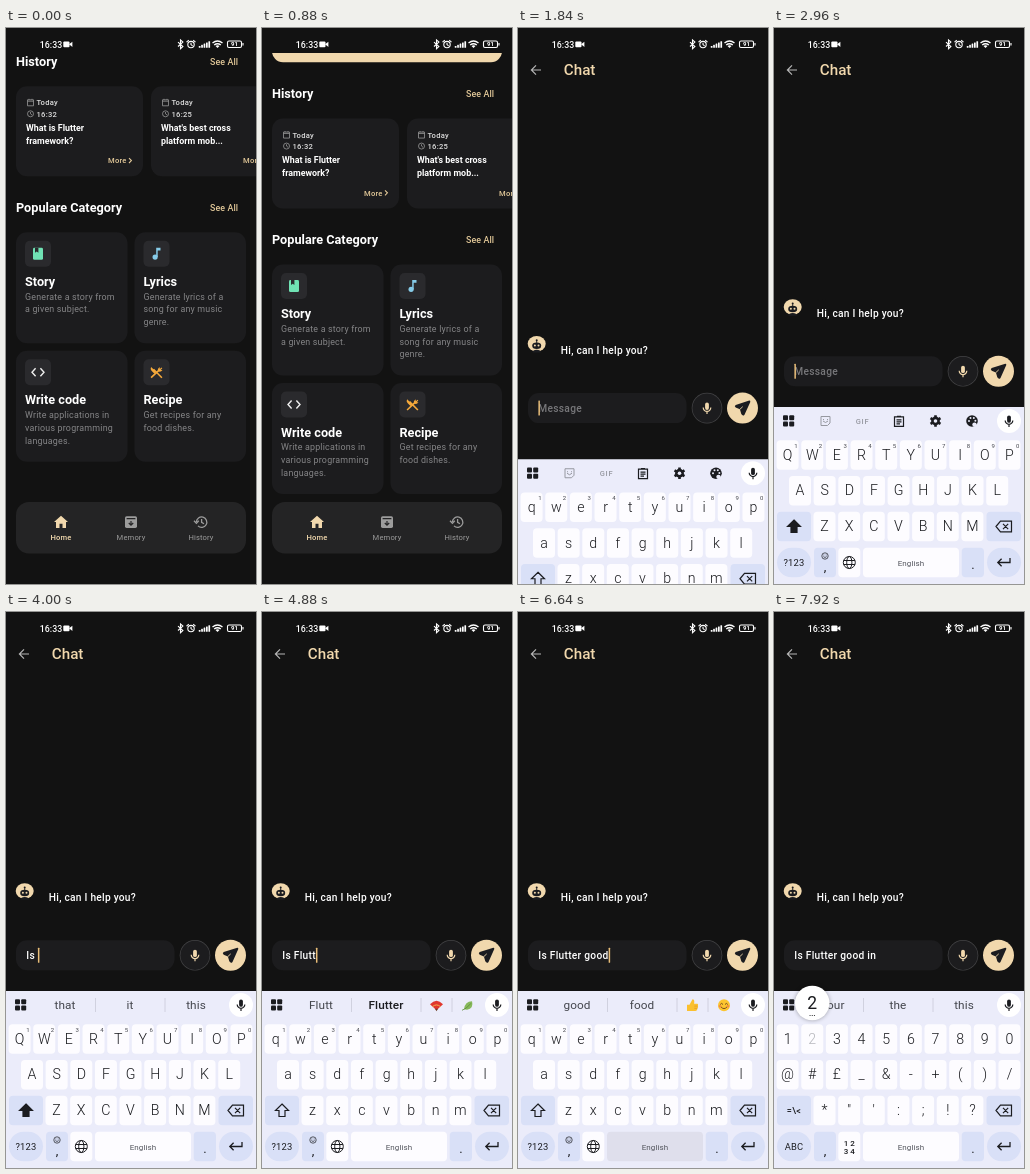
Write an HTML page with a canvas that moves like this. It is 250 px wide and 556 px high and loops after 8000 ms.

```html
<!DOCTYPE html>
<html lang="en">
<head>
<meta charset="utf-8">
<style>
  html, body { margin: 0; width: 100%; height: 100%; overflow: hidden; background: #121212; }
  canvas { display: block; width: 250px; height: 556px; }
</style>
</head>
<body>
<canvas id="stage"></canvas>
<script>
const canvas = document.getElementById('stage'), c = canvas.getContext('2d');
const ratio = window.devicePixelRatio || 1;
canvas.width = 250 * ratio;
canvas.height = 556 * ratio;

const BG = '#121212', CARD = '#1c1c1e', CREAM = '#f1d8ad', WHITE = '#fff', INK = '#1b1c20';
const KEY = '#fdfcff', SPECIAL = '#d9e0f7', BOARD = '#ebecfa';
const LOOP = 8000, RELEASE = 90;

const clamp = v => Math.max(0, Math.min(1, v));
const span = (t, from, to) => clamp((t - from) / (to - from));
const smooth = u => u * u * (3 - 2 * u);
const easeOut = u => 1 - (1 - u) ** 2;

// Drawing helpers
function box(x, y, w, h, r, fill) {
  c.beginPath();
  c.roundRect(x, y, w, h, r);
  c.fillStyle = fill;
  c.fill();
}
function disc(x, y, r, fill, ry = r) {
  c.beginPath();
  c.ellipse(x, y, r, ry, 0, 0, 7);
  c.fillStyle = fill;
  c.fill();
}
// Filled path, or a stroked one when a line width is given
function icon(x, y, path, color, width) {
  c.save();
  c.translate(x, y);
  c.fillStyle = c.strokeStyle = color;
  c.lineWidth = width;
  if (width) c.stroke(new Path2D(path)); else c.fill(new Path2D(path));
  c.restore();
}
function text(str, x, y, size, color, weight = 400, spacing = 0, align = 'left') {
  c.font = `${weight} ${size}px Roboto, sans-serif`;
  c.letterSpacing = spacing + 'px';
  c.textAlign = align;
  c.fillStyle = color;
  c.fillText(str, x, y);
  return c.measureText(str).width;
}
function robot(x, y, r, skin, face) {
  c.save();
  c.translate(x, y);
  c.scale(r / 10, r / 10);
  disc(0, -.8, 10, skin, 8.6);
  icon(0, 0, 'M-4.6 9Q-4.6 5.8 0 5.8Q4.6 5.8 4.6 9Z', face);
  icon(0, 0, 'M0 -4.6V-1.5', face, 1);
  disc(0, -4.8, 1.1, face);
  disc(0, 1.4, 5, face, 3.6);
  disc(-2, 1.2, 1.1, skin);
  disc(2, 1.2, 1.1, skin);
  c.restore();
}
function mic(x, y, color) {
  box(x - 1.9, y - 5.6, 3.8, 7.4, 1.9, color);
  icon(x, y, 'M-3.8 -.5A3.8 3.8 0 0 0 3.8 -.5M0 3.4V6', color, 1.2);
}
function clock(x, y, r, color, width) {
  icon(x, y, `M${r} 0A${r} ${r} 0 1 1 ${-r} 0A${r} ${r} 0 1 1 ${r} 0M0 ${-r * .6}V0L${r * .5} ${r * .4}`, color, width);
}

function statusBar() {
  text('16:33', 33.8, 19.5, 8.8, WHITE, 500);
  box(57.3, 13.4, 6.2, 5.8, 1, WHITE);
  icon(63, 16.3, 'M0 0L3.4 -2.6V2.6Z', WHITE);
  icon(174.5, 16.3, 'M-2.5 -2.2L2.4 2.2L0 4.4V-4.4L2.4 -2.2L-2.5 2.2', WHITE, 1.1);
  clock(185, 16.6, 3.2, WHITE, 1.1);
  icon(185, 16.5, 'M-4.5 -2.4L-2.2 -4.4M4.5 -2.4L2.2 -4.4', WHITE, 1.1);
  for (let i = 0; i < 5; i++) box(192.8 + i * 2.4, 18 - i * 1.2, 1.7, 1.8 + i * 1.2, .4, WHITE);
  icon(211.5, 20, 'M-5 -5Q0 -9 5 -5M-3.3 -3Q0 -5.6 3.3 -3', WHITE, 1.4);
  icon(211.5, 20, 'M0 0L-2 -2Q0 -3.4 2 -2Z', WHITE);
  icon(221.5, 13, 'M1.5 0H12.5Q14 0 14 1.5V5Q14 6.5 12.5 6.5H1.5Q0 6.5 0 5V1.5Q0 0 1.5 0M15.5 2V4.6', WHITE, 1.1);
  text('91', 228.5, 18.4, 6, WHITE, 600, 0, 'center');
}

// Home page
function sectionTitle(title, y) {
  text(title, 10, y, 12.7, WHITE, 700);
  text('See All', 204, y - .8, 8.9, '#e3c999', 500, .1);
}
function historyCard(x, y, time, lines) {
  box(x, y, 127, 90, 11, CARD);
  icon(x + 11.5, y + 12.5, 'M0 1H6V7H0ZM0 2.4H6M1.5 0V1M4.5 0V1', '#999', .8);
  clock(x + 14.5, y + 27.5, 3, '#999', .8);
  text('Today', x + 20.5, y + 19, 7.6, '#dedede', 500, .25);
  text(time, x + 20.5, y + 30.5, 7.6, '#dedede', 500, .25);
  lines.forEach((line, i) => text(line, x + 10, y + 44.8 + i * 12.7, 8.9, WHITE, 700));
  text('More', x + 92, y + 77, 7.6, '#e3c999', 500, .25);
  icon(x + 113, y + 74.3, 'M0 -2.4L2.4 0L0 2.4', '#e3c999', 1.1);
}
function categoryCard(x, y, title, lines, drawIcon) {
  box(x, y, 111.5, 111, 11, CARD);
  box(x + 9, y + 8.5, 26, 26, 5, '#2a2a2d');
  drawIcon(x + 22, y + 21.5);
  text(title, x + 9, y + 53.5, 12.7, WHITE, 700);
  lines.forEach((line, i) => text(line, x + 9, y + 67.3 + i * 12.8, 8.9, '#858587', 400, .2));
}
const categories = [
  ['Story', ['Generate a story from', 'a given subject.'], (x, y) => {
    box(x - 5, y - 6, 10, 12, 1.4, '#70e2b4');
    icon(x - 3, y - 6, 'M0 0H3.4V5L1.7 3.8L0 5Z', '#2a2a2d');
  }],
  ['Lyrics', ['Generate lyrics of a', 'song for any music', 'genre.'], (x, y) => {
    disc(x - 1.4, y + 3.3, 2.6, '#86cbe8');
    icon(x, y, 'M-.3 3.3V-6H4V-3.4H1.2V3.3Z', '#86cbe8');
  }],
  ['Write code', ['Write applications in', 'various programming', 'languages.'], (x, y) =>
    icon(x, y, 'M-2.4 -4L-6 0L-2.4 4M2.4 -4L6 0L2.4 4', '#eee', 1.4)],
  ['Recipe', ['Get recipes for any', 'food dishes.'], (x, y) => {
    icon(x, y, 'M5.4 5.4L-3 -3M-5.4 5.4L2.6 -2.2', '#f5a93b', 1.6);
    icon(x, y, 'M-5.4 -5.4L-.2 -.2L-2 1.4L-5 -1.6Q-6.6 -3.5 -5.4 -5.4ZM1.4 -1.2Q.6 -3.4 3 -5.2L3.4 -3.2L5 -4.8L5.8 -4L4.2 -2.4L6 -2.2Q4 .6 1.4 -1.2Z', '#f5a93b');
  }],
];
function navBar() {
  c.fillStyle = BG;
  c.fillRect(0, 500, 250, 56);
  box(10, 474, 230, 51.5, 13, '#242425');
  icon(55, 494, 'M0 -6.3L7 0H5V6H1.5V1.8H-1.5V6H-5V0H-7Z', CREAM);
  box(119, 488.3, 12, 11.6, 1.6, '#9c9c9c');
  icon(125, 494, 'M-4.4 -3.4H4.4M0 -1V3M-2.2 1L0 3.2L2.2 1', '#242425', 1.2);
  icon(195, 494, 'M-4.6 0A5.2 5.2 0 1 1 -3 3.9M-7 -1.2L-4.6 1.4L-2.2 -1.2M.6 -3V.4L3 1.8', '#9c9c9c', 1.3);
  ['Home', 'Memory', 'History'].forEach((label, i) =>
    text(label, 55 + 70 * i, 511.8, 7.6, i ? '#9c9c9c' : CREAM, i ? 400 : 500, .15, 'center'));
}
function home(scroll) {
  c.save();
  c.beginPath();
  c.rect(0, 25, 250, 531);
  c.clip();
  c.translate(0, -scroll);
  text('Blethy', 10, 53.5, 20.4, CREAM, 600);
  box(197, 34, 43, 25, 12.5, CREAM);
  icon(209.5, 46.7, 'M0 -4.6L1.3 -1.5L4.5 -1.3L2 .8L2.8 4L0 2.2L-2.8 4L-2 .8L-4.5 -1.3L-1.3 -1.5Z', INK);
  text('20', 217.5, 51.3, 12.7, INK, 500);

  box(10, 73, 230, 122, 11, CREAM);
  text('Tap to chat', 20.3, 119, 22.5, INK, 500);
  box(190, 95, 40, 32, 15, '#141416');
  icon(210, 111, 'M-7.5 0H6M1 -5L6.2 0L1 5', CREAM, 2.2);
  robot(31.5, 159, 11, INK, CREAM);
  box(48, 149, 174, 36, 6, '#ecc986');
  text('Ask me any questions you have. I can', 53.5, 163.6, 8.9, '#4d463b', 400, .18);
  text('answer all questions and talk to you', 53.5, 176.6, 8.9, '#4d463b', 400, .18);

  sectionTitle('History', 231);
  historyCard(10, 251.3, '16:32', ['What is Flutter', 'framework?']);
  historyCard(145, 251.3, '16:25', ["What's best cross", 'platform mob...']);
  sectionTitle('Populare Category', 376.7);
  categories.forEach((item, i) => categoryCard(10 + 118.5 * (i % 2), 397.3 + 118.5 * (i >> 1), ...item));
  c.restore();
  navBar();
}

// Typing: press time and key
const strokes = [
  [2720, 'shift'], [3040, 'I'], [3360, 's'], [3600, ' '], [3840, 'shift'],
  [4160, 'F'], [4320, 'l'], [4480, 'u'], [4600, 't'], [4740, 't'], [4945, 'e'], [5190, 'r'], [5440, ' '],
  [5740, 'g'], [5960, 'o'], [6160, 'o'], [6360, 'd'], [6620, ' '],
  [6870, 'i'], [7030, 'n'], [7120, ' '], [7355, '?123'], [7900, '2'],
];
const suggestions = {
  'I': "I I'm In", 'Is': "Is It's Isn't", 'Is ': 'that it this',
  'F': 'For Flutter From', 'Fl': 'Fl Flutter Floor', 'Flu': 'Flu Flutter Fluent', 'Flut': 'Flut Flutter Flute',
  'Flutt': 'Flutt Flutter fan leaf', 'Flutte': 'Flutte Flutter fan leaf', 'Flutter': 'Flutter flutters fan leaf',
  'Flutter ': 'is and for', 'g': 'good great get', 'go': 'go good going', 'goo': 'goo good goods',
  'good': 'good food thumb smile', 'good ': 'for to in', 'i': 'in is it', 'in': 'in into inn', 'in ': 'your the this',
};
function typingAt(t) {
  const s = { text: '', caps: false, symbols: false, pressed: null, last: 1700 };
  for (const [at, key] of strokes) {
    if (t >= at && t < at + RELEASE + 10) s.pressed = key;
    if (t < at + RELEASE) break;
    if (key === 'shift') s.caps = true;
    else if (key === '?123') s.symbols = true;
    else { s.text += key; s.caps = false; s.last = at + RELEASE; }
  }
  return s;
}

const emoji = {
  fan(x, y) {
    icon(x, y, 'M0 5L-6.5 -1Q0 -8 6.5 -1Z', '#e0372f');
    icon(x, y, 'M-4 1.3Q0 -2 4 1.3', '#f4b64c', 1);
    icon(x, y, 'M-1.5 3.5L0 6L1.5 3.5Z', '#6b3a24');
  },
  leaf(x, y) {
    icon(x, y, 'M-4 4Q-3 -4 4 -4Q6 3 -1 4.5Z', '#86b85a');
    icon(x, y, 'M-6 5Q-2 4 3 -2', '#5d8b3c', .8);
  },
  thumb(x, y) {
    icon(x, y, 'M-5.5 -.5H-3L0 -6Q2.4 -6 1.6 -1.6H5Q6 -1 5.4 .5Q6 2 5 3Q5 5.6 3 5.6H-5.5Z', '#fbc02f');
    icon(x, y, 'M1.8 .8H5M1.8 3H4.8', '#dd9420', .7);
  },
  smile(x, y) {
    disc(x, y, 6, '#fcc530');
    icon(x, y, 'M-3.8 -.8Q-2.4 -3 -1 -.8M1 -.8Q2.4 -3 3.8 -.8M-3 1.6Q0 5 3 1.6', '#6b421c', .9);
    disc(x - 4, y + 1, 1.2, '#f28a45');
    disc(x + 4, y + 1, 1.2, '#f28a45');
  },
};

function keyboardTop(state) {
  for (const x of [9, 15.2]) for (const y of [8.3, 14.5]) box(x, y, 5, 5, 1, INK);
  disc(235, 14, 12, WHITE);
  mic(235, 14, INK);
  const word = state.text.match(/\S* ?$/)[0];
  if (!suggestions[word]) {
    icon(51.5, 14, 'M-4.5 -4.5H4.5V2L2 4.5H-4.5ZM-2.5 0Q0 3 2.5 0M-2 -2V-1M2 -2V-1', '#9698a0', 1);
    text('GIF', 88.5, 16.8, 7.5, '#9698a0', 500, .8, 'center');
    icon(125, 14.3, 'M-4.5 -4.5H4.5V5H-4.5ZM-2 -5H2M-2.5 -1.5H2.5M-2.5 .5H2.5M-2.5 2.5H1', INK, 1.2);
    icon(161.5, 14, 'M0 -5.8V5.8M-5 -2.9L5 2.9M-5 2.9L5 -2.9', INK, 2.6);
    disc(161.5, 14, 4.4, INK);
    disc(161.5, 14, 1.8, BOARD);
    disc(198, 14, 5.8, INK);
    for (const [x, y] of [[-3, 0], [-1.5, -3], [1.8, -3], [3.4, -.2]]) disc(198 + x, 14 + y, 1, BOARD);
    disc(200.5, 17.6, 2.2, BOARD);
    return;
  }
  const words = suggestions[word].split(' ');
  const dividers = words.length > 3 ? [89.5, 159, 190] : [89.5, 159];
  for (const x of dividers) icon(x, 7, 'M0 0V14', '#c9cbd8', .8);
  words.forEach((option, i) => {
    const x = [59, 124, words.length > 3 ? 174.5 : 190, 206][i];
    const strong = i === 1 && /^Flutte?$/.test(word);
    if (emoji[option]) emoji[option](x, 14.3);
    else text(option, x, 18.2, 11.8, strong ? INK : '#44464d', strong ? 500 : 400, .1, 'center');
  });
}

function keyboard(state) {
  c.fillStyle = BOARD;
  c.fillRect(0, 0, 250, 180);
  keyboardTop(state);
  const rows = state.symbols ? ['1234567890', '@#£_&-+()/', '*"\':;!?'] : ['qwertyuiop', 'asdfghjkl', 'zxcvbnm'];
  let popup;
  rows.forEach((row, r) => [...row].forEach((char, i) => {
    const x = (r === 2 ? 50.5 : r && !state.symbols ? 26 : 13.6) + 24.65 * i, y = [48, 83.7, 119.5][r];
    const label = state.caps ? char.toUpperCase() : char;
    const held = state.pressed === label;
    if (held) popup = [x, y, label];
    box(x - 11, y - 14.7, 22, 29.4, 4, KEY);
    text(label, x, y + 4.6, 14.2, held ? '#b4b5bb' : INK, 300, 0, 'center');
    if (!r && !state.symbols) text((i + 1) % 10, x + 8.3, y - 7.5, 6, '#44464d', 400, 0, 'center');
  }));

  box(3, 104.8, 34, 29.4, 4, state.pressed === 'shift' ? '#bcc6e6' : SPECIAL);
  if (state.symbols) text('=\\<', 20, 123, 9, INK, 500, .3, 'center');
  else {
    const arrow = 'M0 -6.5L6.5 0H3V6H-3V0H-6.5Z';
    if (state.caps) icon(20, 119.5, arrow, INK);
    icon(20, 119.5, arrow, INK, 1.2);
  }
  box(212.5, 104.8, 34.5, 29.4, 4, SPECIAL);
  icon(230, 119.5, 'M-8 0L-3.5 -5.4H7.5V5.4H-3.5ZM-1 -2.6L4.2 2.6M4.2 -2.6L-1 2.6', INK, 1.2);

  const y = 155.5, bottom = y - 14.7;
  box(3, bottom, 34, 29.4, 14.7, state.pressed === '?123' ? '#bcc6e6' : SPECIAL);
  text(state.symbols ? 'ABC' : '?123', 20, y + 3.4, 9.4, INK, 400, .2, 'center');
  box(40, bottom, 22, 29.4, 4, SPECIAL);
  text(',', 51, y + 8, 13, INK, 400, 0, 'center');
  box(64.3, bottom, 22, 29.4, 4, KEY);
  if (state.symbols) {
    text('1 2', 75.3, y - 1, 8, INK, 500, 0, 'center');
    text('3 4', 75.3, y + 7, 8, INK, 500, 0, 'center');
  } else {
    icon(51, y - 6.5, 'M3.2 0A3.2 3.2 0 1 1 -3.2 0A3.2 3.2 0 1 1 3.2 0M-1.6 .6Q0 2.4 1.6 .6M-1.2 -1.4V-.6M1.2 -1.4V-.6', INK, .7);
    icon(75.3, y, 'M6 0A6 6 0 1 1 -6 0A6 6 0 1 1 6 0M2.6 0A2.6 6 0 1 1 -2.6 0A2.6 6 0 1 1 2.6 0M-5.6 -2H5.6M-5.6 2H5.6', INK, 1);
  }
  box(89, bottom, 96, 29.4, 4, state.pressed === ' ' ? '#dfdfec' : KEY);
  text('English', 137, y + 3, 8, '#55575f', 400, .1, 'center');
  box(187.7, bottom, 22.3, 29.4, 4, SPECIAL);
  text('.', 199, y + 6.5, 13, INK, 400, 0, 'center');
  box(213, bottom, 34, 29.4, 14.7, SPECIAL);
  icon(230, y, 'M6 -4.5V0H-6M-2.4 -3.8L-6.2 0L-2.4 3.8', INK, 1.3);

  if (popup) {
    const [px, py, label] = popup;
    c.shadowColor = '#0005';
    c.shadowBlur = 4 * ratio;
    disc(px, py - 36, 17.3, WHITE);
    c.shadowBlur = 0;
    text(label, px, py - 29.8, 17.5, INK, 400, 0, 'center');
    if (py < 50) for (const dx of [-2.2, 0, 2.2]) disc(px + dx, py - 23.5, .6, INK);
  }
}

// Chat page
function chat(t) {
  const state = typingAt(t);
  const y = 521 - 177.7 * easeOut(span(t, 1683, 1973));
  c.fillStyle = BG;
  c.fillRect(0, 0, 250, 556);
  icon(18, 42, 'M5 0H-4.4M0 -4.6L-4.6 0L0 4.6', '#b5b5b5', 1.2);
  text('Chat', 45.8, 47, 15.2, CREAM, 500);
  robot(18.7, y - 63.6, 9, CREAM, INK);
  text('Hi, can I help you?', 42.8, y - 54.2, 10.2, WHITE, 500, .25);

  box(10, y - 15, 158.5, 30, 11, CARD);
  let caret = 21;
  if (state.text) caret += text(state.text, 20.3, y + 3.4, 10.2, WHITE, 500, .28);
  else text('Message', 20.3, y + 3.4, 10.2, '#77777a', 500, .28);
  if (t > 1690 && (t - state.last) % 1000 < 500) box(caret - .6, y - 7.5, 1.5, 15, .5, '#e8bd78');

  disc(189, y, 15.3, '#444446');
  disc(189, y, 14.6, CARD);
  mic(189, y, CREAM);
  disc(224.5, y, 15.5, CREAM);
  icon(224.5, y, 'M7.8 -6.2Q8 -8 6 -7.4L-6.8 -3.2Q-8.6 -1.8 -6.8 -.6L-2.6 1.2L-1.2 6Q.4 8.6 2 6.6Z', INK);
  icon(224.5, y, 'M-2.6 1.2L.2 -1.4', CREAM, .9);

  const rise = easeOut(span(t, 1704, 2004));
  if (rise) {
    c.save();
    c.translate(0, 556 - 177 * rise);
    keyboard(state);
    c.restore();
  }
}

function draw(t) {
  c.setTransform(ratio, 0, 0, ratio, 0, 0);
  c.fillStyle = BG;
  c.fillRect(0, 0, 250, 556);
  const opening = span(t, 1330, 1630);
  if (opening < 1) home(193 - 23 * smooth(span(t, 300, 720)) - 170 * smooth(span(t, 830, 1190)));
  if (opening) {
    const scale = .88 + .12 * easeOut(opening);
    c.save();
    c.globalAlpha = smooth(clamp(opening * 1.6));
    c.translate(125, 278);
    c.scale(scale, scale);
    c.translate(-125, -278);
    chat(t);
    c.restore();
  }
  statusBar();
}

function tick() {
  draw(performance.now() % LOOP);
  requestAnimationFrame(tick);
}
tick();
</script>
</body>
</html>
```
